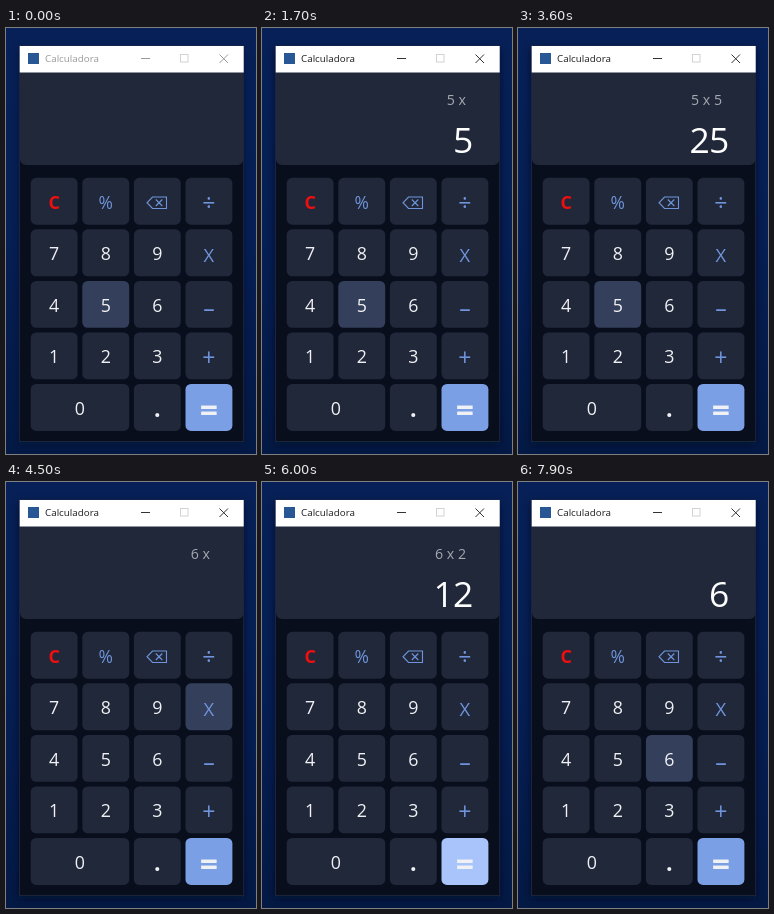
These frames come from a looping animation (250x426 px, 8000 ms). An HTML page:

```html
<!DOCTYPE html>
<html lang="es">
<head>
<meta charset="utf-8">
<title>Calculadora</title>
<style>
html, body { margin: 0; width: 100%; height: 100%; overflow: hidden; background: #051d50; }
svg { display: block; width: 250px; height: 426px; font-family: "Open Sans", "Noto Sans", sans-serif; }
.key { fill: #20283a; }
.key.hover { fill: #343f5b; }
.equals { fill: #7b9fe5; }
.equals.hover { fill: #a9c4fb; }
.label { fill: #f0f1f4; text-anchor: middle; font-weight: 500; }
.op { fill: #7094dc; }
.frame { fill: none; stroke: #222; }
</style>
</head>
<body>
<svg viewBox="0 0 250 426">
  <defs>
    <linearGradient id="desk" x2="0" y2="1">
      <stop offset="0" stop-color="#072158"/>
      <stop offset=".5" stop-color="#061f54"/>
      <stop offset="1" stop-color="#041a45"/>
    </linearGradient>
    <filter id="blur" x="-20%" y="-20%" width="140%" height="140%"><feGaussianBlur stdDeviation="4"/></filter>
  </defs>
  <rect width="250" height="426" fill="url(#desk)"/>
  <rect id="shadow" x="13" y="21" width="225" height="396" fill="#000822" filter="url(#blur)"/>
  <rect x="13.5" y="18" width="224.2" height="395.5" fill="#080e1c" stroke="#252d40" stroke-width=".7"/>
  <path d="M14 44H237.5V131a6 6 0 0 1-6 6H20a6 6 0 0 1-6-6Z" fill="#20283a"/>
  <rect x="13.7" y="18" width="224" height="26.5" fill="#fff"/>
  <rect x="22" y="25" width="11" height="11" fill="#285795"/>
  <text id="title" x="39" y="34.3" font-size="9.8" font-weight="500">Calculadora</text>
  <path id="controls" class="frame" d="M135 30.5h9M213.5 26.5l8.5 8.5m0-8.5l-8.5 8.5"/>
  <rect class="frame" x="174.5" y="26.5" width="7.5" height="7.5" style="stroke:#d2d2d2"/>
  <text id="expr" x="204" y="77" font-size="14.2" font-weight="500" text-anchor="end" fill="#a6a9b0"></text>
  <text id="value" x="210.5" y="124.7" font-size="35.5" letter-spacing="-.8" text-anchor="end" fill="#fff"></text>
  <g id="keys"></g>
  <path d="M146.5 169H160.5V180.5H146.5L141 174.75ZM149.8 171.5l6.5 6.5m0-6.5l-6.5 6.5" fill="none" stroke="#7094dc" stroke-width="1.1"/>
</svg>
<script>
const LOOP = 8000;
const $ = id => document.getElementById(id);
const rows = ["C%<÷", "789X", "456–", "123+", "0 .="];
// font size and baseline offset from the key's centre
const ops = { "%": [17.5, 7.4], "÷": [23, 9.8], "X": [18.5, 9], "–": [23, 12.5], "+": [23, 9.8] };
const signs = { ".": [23, 10], "=": [32, 14.7], "C": [18, 7.4] };
const keys = {};

function add(parent, tag, attrs) {
  const el = document.createElementNS("http://www.w3.org/2000/svg", tag);
  for (const name in attrs) el.setAttribute(name, attrs[name]);
  return parent.appendChild(el);
}

rows.forEach((row, r) => [...row].forEach((name, c) => {
  if (name === " ") return;
  const x = 24.7 + c * 51.6, y = 149.8 + r * 51.55;
  const w = name === "0" ? 98.5 : 46.9;
  const kind = name === "=" ? "equals" : "key";
  keys[name] = add($("keys"), "rect", { x, y, width: w, height: 46.9, rx: 5.5, class: kind });
  if (name === "<") return;
  const [size, drop] = ops[name] || signs[name] || [17.8, 7.6];
  const label = add($("keys"), "text", {
    x: x + w / 2, y: y + 23.3 + drop, "font-size": size,
    class: ops[name] ? "label op" : "label"
  });
  label.textContent = name;
  if (signs[name]) label.style.fontWeight = 700;
  if (name === "C") label.style.fill = "#f00e0e";
}));

// pointer position: [ms, key]
const hovers = [
  [0, "5"], [600, "6"], [700, "9"], [800, "X"], [1200, "9"], [1300, "6"], [1400, "5"],
  [1800, "6"], [1850, "3"], [1900, "="], [2300, "3"], [2400, "2"], [3200, "5"],
  [3800, "6"], [4200, "9"], [4300, "X"], [4700, "9"], [4800, "5"], [4900, "2"],
  [5400, "3"], [5500, "="], [6500, "+"], [6600, "3"], [6800, "2"], [7300, "5"], [7500, "6"]
];
// display: [ms, expression, value]
const screens = [
  [0, "", ""], [300, "", "5"], [900, "5 x", ""], [1600, "5 x", "5"], [2100, "5 x 5", "25"],
  [4000, "", "6"], [4500, "6 x", ""], [5200, "6 x", "2"], [5800, "6 x 2", "12"], [7700, "", "6"]
];
const at = (steps, t) => steps.findLast(step => step[0] <= t);

function draw(now) {
  const t = now % LOOP;
  const [, hot] = at(hovers, t);
  for (const name in keys) keys[name].classList.toggle("hover", name === hot);
  const [, expr, value] = at(screens, t);
  $("expr").textContent = expr;
  $("value").textContent = value;
  const active = t >= 300;
  $("title").style.fill = active ? "#1c1c1c" : "#999";
  $("controls").style.stroke = active ? "#333" : "#999";
  $("shadow").style.opacity = active ? .65 : .4;
}

const start = performance.now();
function tick() {
  draw(performance.now() - start);
  requestAnimationFrame(tick);
}
tick();
</script>
</body>
</html>
```
